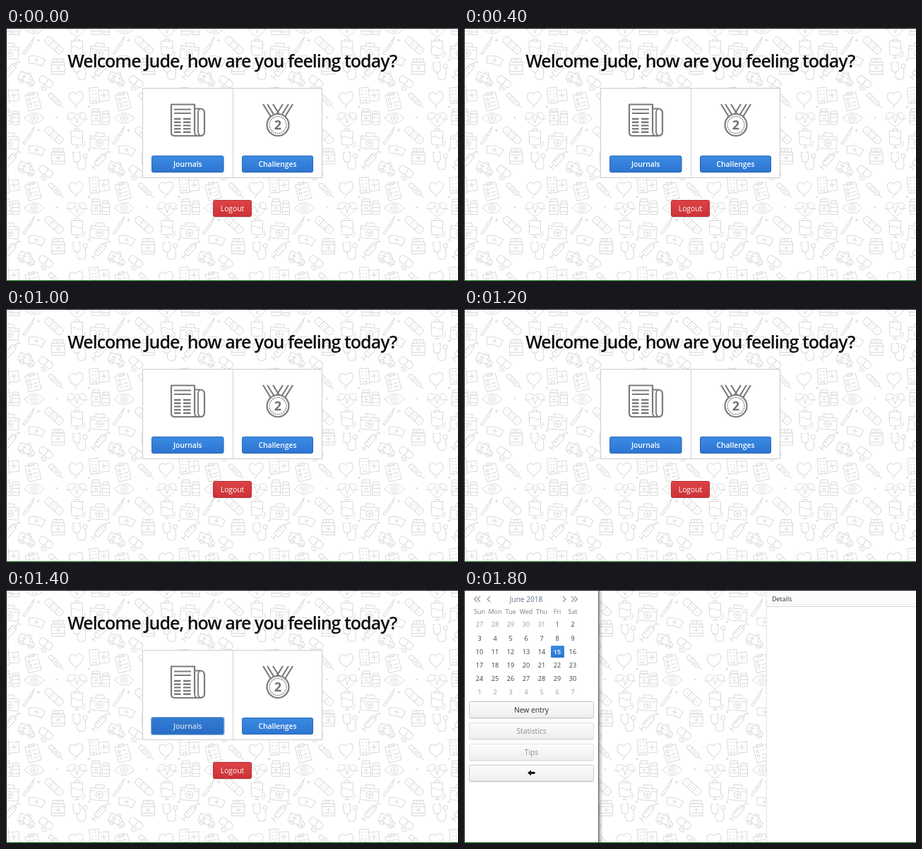
These frames come from a looping animation (640 by 359 pixels, 2.5 s). An HTML page:

```html
<!DOCTYPE html>
<html lang="en">
<head>
<meta charset="utf-8">
<title>Health journal</title>
<style>
html, body { margin: 0; width: 100%; height: 100%; overflow: hidden; background: #fff; }
svg { display: block; width: 640px; height: 359px; }
text { font-family: "Open Sans", sans-serif; text-anchor: middle; }
.icon { fill: none; stroke: #d9d9d9; stroke-width: 1; stroke-linejoin: round; stroke-linecap: round; }
.big { fill: none; stroke: #7b7b7b; stroke-width: 2.2; stroke-linejoin: round; }
</style>
</head>
<body>
<svg id="stage" viewBox="0 0 640 359">
  <defs>
    <linearGradient id="blue" x2="0" y2="1"><stop stop-color="#3b8be2"/><stop offset="1" stop-color="#2d75d2"/></linearGradient>
    <linearGradient id="red" x2="0" y2="1"><stop stop-color="#dc4346"/><stop offset="1" stop-color="#cd3237"/></linearGradient>
    <linearGradient id="grey" x2="0" y2="1"><stop stop-color="#fcfcfc"/><stop offset="1" stop-color="#eeeeee"/></linearGradient>
    <linearGradient id="shade"><stop stop-color="#333" stop-opacity=".75"/><stop offset=".3" stop-color="#555" stop-opacity=".35"/><stop offset="1" stop-color="#777" stop-opacity="0"/></linearGradient>
    <g id="tile" class="icon"></g>
  </defs>
  <rect width="640" height="359" fill="#fff"/>
  <g id="wall"></g>
  <g id="home"></g>
  <g id="diary" opacity="0"></g>
  <path d="M0 .5H640M.5 0V358" stroke="#1a1a1a" fill="none"/>
  <rect y="358" width="640" height="1" fill="#0b6f12"/>
</svg>
<script>
const NS = 'http://www.w3.org/2000/svg';
const LOOP = 2500, OPEN = 1800, PRESS = 1300, TILE = 127.5;
const $ = id => document.getElementById(id);

function add(parent, tag, attrs, label) {
  const el = document.createElementNS(NS, tag);
  for (const k in attrs) el.setAttribute(k, attrs[k]);
  if (label !== undefined) el.textContent = label;
  return parent.appendChild(el);
}
const rect = (p, x, y, width, height, fill, more) => add(p, 'rect', { x, y, width, height, fill, ...more });
const text = (p, x, y, size, fill, label, more) => add(p, 'text', { x, y, 'font-size': size, fill, ...more }, label);
const line = (p, d, more) => add(p, 'path', { d, ...more });

// Wallpaper: x, y, rotation, outline
const heart = 'M0 11C-21-1-13-15 0-6C13-15 21-1 0 11z';
const icons = [
  [227, 99, -8, 'M-1 10C-5 8-10 3-10-2C-10-9-3-10 0-5C3-10 10-8 10-2C10 4 3 6-1 10zM-1 10L-4 14'],
  [259, 95, -5, 'M-13-11H0V11H-13zM-10-7H-8M-5-7H-3M-10-2H-8M-5-2H-3M-10 3H-8M-5 3H-3M-9 11V7H-4V11M0-6H14V9H0M7-3V5M3 1H11'],
  [293, 103, -14, 'M-9-10H9V13H-9zM-4-12H4V-8H-4zM-6-4H-3V-1H-6zM0-3H6M-6 2H-3V5H-6zM0 3H6M-6 8H-3M0 8H6'],
  [326, 103, 45, 'M-12-3H7Q10 0 7 3H-12Q-15 0-12-3zM-6-3V3M-3 0H5M9 0H14'],
  [228, 129, 0, heart + 'M-15 0H-6L-3-5L0 6L4-6L6 0H15'],
  [261, 127, 0, 'M-12-8H0V10H-12zM-11-12H-1V-8H-11zM-12-3H0M-12 5H0M-6-1V3M-8 1H-4M3-5H13V10H3zM4-9H12V-5H4zM3 0H13M3 6H13'],
  [295, 128, 0, 'M-14 0Q0-15 14 0Q0 15-14 0zM-5 0A5 5 0 1 0 5 0A5 5 0 1 0-5 0M-2 0A2 2 0 1 0 2 0A2 2 0 1 0-2 0'],
  [228, 157, 0, 'M-8-11H8V6Q8 9 5 9H-5Q-8 9-8 6zM-3-11V-14H3V-11M-8-2Q-4-5 0-2T8-2M0 9V13M-3 13H3M8 12Q12 12 11 4'],
  [260, 160, 4, 'M-13-6H13V11H-13zM-6-6V-11H6V-6M-13-2H-6M6-2H13M-5 3A5 5 0 1 0 5 3A5 5 0 1 0-5 3M0 0V6M-3 3H3'],
  [288, 152, -55, 'M-15-1H0L14-1L3 2H-15zM0-1V2'],
  [323, 152, 42, 'M-11-5H11Q15-5 15 0T11 5H-11Q-15 5-15 0T-11-5zM-5-5V5M5-5V5M-2-2H-1M2-2H3M-2 2H-1M2 2H3M-10 0H-9M9 0H10'],
  [298, 174, 12, 'M-12-4Q0-9 12-4L9 6Q0 3-9 6zM0-4V2M-3-1H3'],
  [232, 188, -4, 'M-6-12H-9V-4Q-9 2-4 2T1-4V-12H-2M-4 2V7Q-4 13 2 13T8 7V-3M5-6A3 3 0 1 0 11-6A3 3 0 1 0 5-6'],
  [261, 187, -48, 'M-9-4H8V4H-9zM8-2H11V2H8M11 0H17M-9 0H-15M-15-4V4M-4-4V0M0-4V0M4-4V0'],
  [285, 199, 22, 'M-12-6H3L8-1L12 1V6H-12zM3-6V0H8M-5-4V2M-8-1H-2M-9 6A3 3 0 1 0-3 6A3 3 0 1 0-9 6M4 6A3 3 0 1 0 10 6A3 3 0 1 0 4 6M-2-6V-9H2V-6'],
  [312, 204, 35, 'M-7-5H5Q10-5 10 0T5 5H-7Q-11 5-11 0T-7-5zM0-5V5M-2 8A4 4 0 1 0 6 8M-2 8H6'],
  [329, 182, 0, 'M-9-6H9V11H-9zM-7-11H7V-6H-7zM-9-2H9M-9 7H9M0 0V5M-3 2.5H3M-3-11V-7M1-11V-7'],
  [301, 145, 0, 'M0-2V2M-2 0H2'],
  [245, 112, 0, 'M0-1.5V1.5M-1.5 0H1.5'],
  [327, 127, 0, 'M-1 0A1 1 0 1 0 1 0A1 1 0 1 0-1 0'],
  [274, 176, 0, 'M-1 0A1 1 0 1 0 1 0A1 1 0 1 0-1 0'],
  [245, 173, 0, 'M0-1.5V1.5M-1.5 0H1.5']
];
for (const [x, y, r, d] of icons) line($('tile'), d, { transform: `translate(${x} ${y}) rotate(${r})` });
for (let col = -2; col < 4; col++)
  for (let row = -2; row < 3; row++)
    add($('wall'), 'use', { href: '#tile', x: col * TILE, y: row * TILE });

function button(p, x, y, w, h, paint, edge, label, color, weight = 400) {
  rect(p, x + .5, y + 1.5, w - 1, h - 1, 'none', { rx: 2, stroke: '#000', 'stroke-opacity': .1 });
  rect(p, x + .5, y + .5, w - 1, h - 1, `url(#${paint})`, { rx: 2, stroke: edge });
  if (label) text(p, x + w / 2, y + h / 2 + 4, 10.3, color, label, { 'font-weight': weight });
}

// Welcome screen
const home = $('home');
text(home, 320.3, 56, 25, '#0c0c0c', 'Welcome Jude, how are you feeling today?', { 'font-weight': 600, 'letter-spacing': '-1' });
rect(home, 193.5, 85.5, 254, 127, '#fff', { stroke: '#cbcbcb' });
line(home, 'M321.5 86V212', { stroke: '#d2d2d2' });

const paper = add(home, 'g', { class: 'big' });
line(paper, 'M267 147V108.5H234V148Q234 153 239 153H275Q281 153 281 147V121Q281 114.5 275 114.5H267');
line(paper, 'M275 114.5Q272 116 272 121V147Q272 151 275 153M267 147Q267 153 272 153', { 'stroke-width': 1.8 });
line(paper, 'M238 115.5H262M238 121H262');
let rows = '';
for (let y = 129; y < 149; y += 4.7) rows += `M238 ${y}H247.5M251 ${y}H261.5`;
line(paper, rows, { 'stroke-width': 2.4 });

const medal = add(home, 'g', { class: 'big' });
const ribbon = 'M364 108L375 126M370 108L380 124M378 108L387 122.5';
line(medal, ribbon);
line(medal, ribbon, { transform: 'translate(770) scale(-1 1)' });
add(medal, 'circle', { cx: 385, cy: 137.5, r: 15.5, fill: '#fff' });
add(medal, 'circle', { cx: 385, cy: 137.5, r: 12, 'stroke-width': 1.3, 'stroke-dasharray': '1.8 1.2' });
text(home, 385, 144, 18, '#707070', '2', { 'font-weight': 700 });

button(home, 206, 181, 102.5, 24, 'blue', '#2a69ba', 'Journals', '#fff', 600);
button(home, 334, 181, 101, 24, 'blue', '#2a69ba', 'Challenges', '#fff', 600);
button(home, 293, 244, 55, 24, 'red', '#b73136', 'Logout', '#fff', 500);
const press = rect(home, 206, 181, 102.5, 24, '#164f9f', { rx: 2, opacity: 0 });
const focus = rect(home, 205.6, 180.6, 103.3, 24.8, 'none', { rx: 2.5, stroke: '#83acdf', 'stroke-width': 1.3, opacity: 0 });

// Diary screen
const diary = $('diary');
rect(diary, 190, 0, 7, 358, 'url(#shade)');
rect(diary, 0, 0, 190.5, 358, '#fff');
line(diary, 'M190.5 0V358', { stroke: '#6a6a6a' });
text(diary, 88, 16.5, 10.1, '#5f7186', 'June 2018');
// Chevrons: left edge and direction
for (const [x, dir] of [[14.5, -1], [19, -1], [33, -1], [140, 1], [152, 1], [156.5, 1]]) {
  const tip = dir < 0 ? x : x + 4, back = dir < 0 ? x + 4 : x;
  line(diary, `M${back} 9L${tip} 13L${back} 17`, { fill: 'none', stroke: '#8c98a6', 'stroke-width': 1.2 });
}

const colX = i => 22 + 22 * i;
['Sun', 'Mon', 'Tue', 'Wed', 'Thu', 'Fri', 'Sat'].forEach((d, i) => text(diary, colX(i), 34, 8.9, '#7a7a7a', d));
rect(diary, 123, 79, 19, 17, 'url(#blue)', { rx: 1.5 });
for (let i = 0; i < 42; i++) {
  const day = i - 4, inside = day > 0 && day <= 30;
  const label = day < 1 ? day + 31 : inside ? day : day - 30;
  const color = day === 15 ? '#fff' : inside ? '#3c3c3c' : '#9b9b9b';
  text(diary, colX(i % 7), 52.4 + 19.2 * Math.floor(i / 7), 9, color, label, { 'font-weight': day === 15 ? 600 : 400 });
}
button(diary, 7, 158, 177, 24, 'grey', '#c6c6c6', 'New entry', '#2c2c2c');
button(diary, 7, 188, 177, 24, 'grey', '#dedede', 'Statistics', '#8d8d8d');
button(diary, 7, 218, 177, 24, 'grey', '#dedede', 'Tips', '#8d8d8d');
button(diary, 7, 248, 177, 24, 'grey', '#c6c6c6');
line(diary, 'M90 259.5L95 255.5V258H100.5V261H95V263.5z', { fill: '#111' });

rect(diary, 428, 0, 212, 358, '#fff');
rect(diary, 428, 1, 212, 20, '#fcfcfc');
line(diary, 'M428.5 0V358', { stroke: '#e4e4e4' });
line(diary, 'M428 20.5H640', { stroke: '#ececec' });
line(diary, 'M428 23.5H640', { stroke: '#d6d6d6' });
text(diary, 450, 15.5, 8.9, '#2e2e2e', 'Details', { 'font-weight': 500 });

// Steps of [ms, opacity]; each value holds until the next
function play(el, steps) {
  const frames = steps.map(([ms, opacity]) => ({ offset: ms / LOOP, opacity, easing: 'steps(1, end)' }));
  frames.push({ offset: 1, opacity: steps[steps.length - 1][1] });
  return el.animate(frames, { duration: LOOP, iterations: Infinity });
}
const start = document.timeline.currentTime || 0;
[
  play(home, [[0, 1], [OPEN, 0]]),
  play(diary, [[0, 0], [OPEN, 1]]),
  play(focus, [[0, 0], [PRESS, 1]]),
  play(press, [[0, 0], [PRESS, .3], [PRESS + 100, .22], [PRESS + 200, .14], [PRESS + 300, .07], [PRESS + 400, 0]])
].forEach(a => { a.startTime = start; });
</script>
</body>
</html>
```
